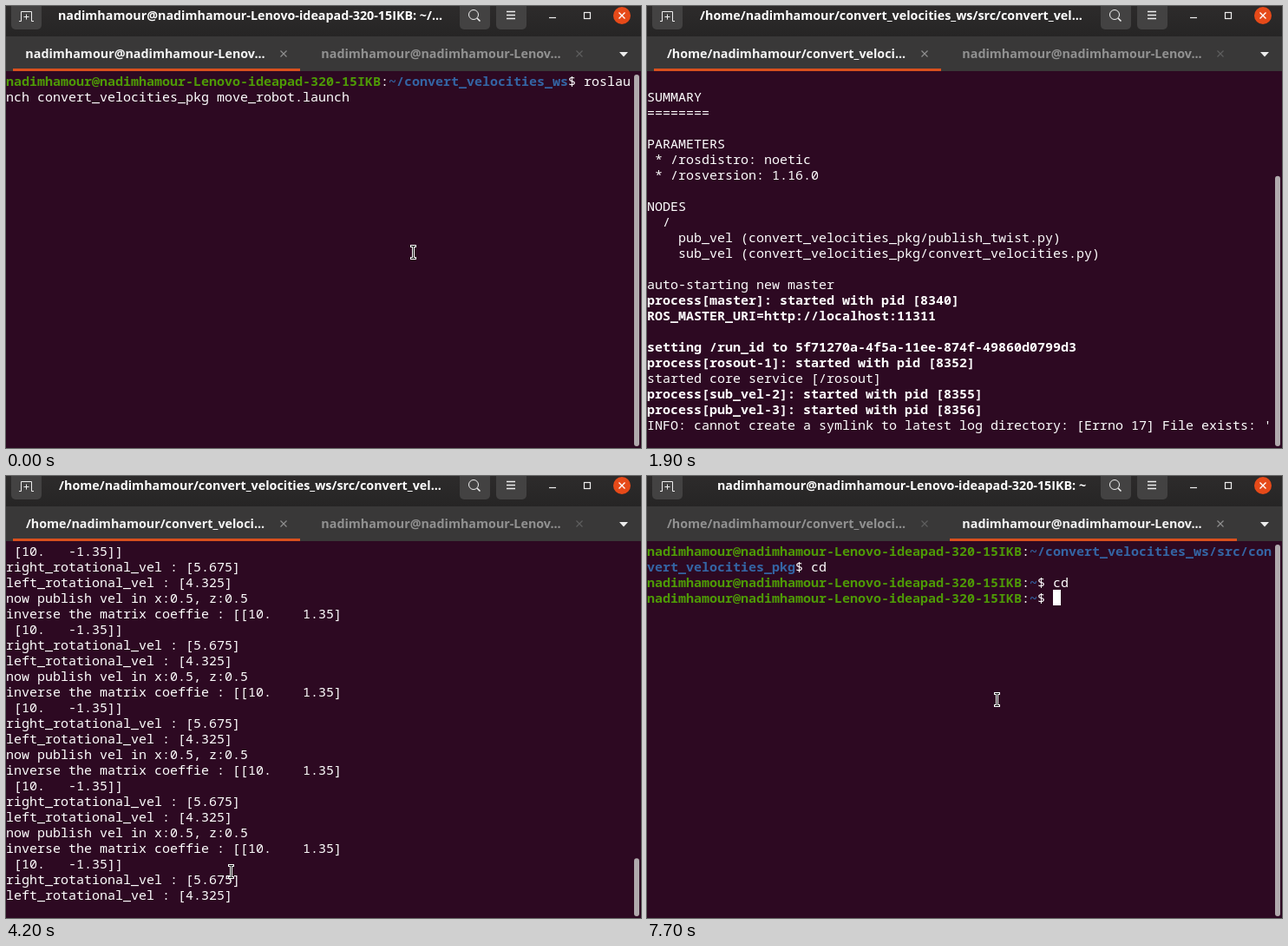
Recreate the animation shown at these times as an HTML page with a canvas. Size 732 by 509 pixels, loop 8000 ms.

```html
<!DOCTYPE html>
<html lang="en">
<head>
<meta charset="utf-8">
<title>Terminal</title>
<style>
html, body { margin: 0; width: 732px; height: 509px; overflow: hidden; background: #2d0922; }
canvas { display: block; }
</style>
</head>
<body>
<canvas id="stage" width="732" height="509"></canvas>
<script>
const ctx = document.getElementById('stage').getContext('2d');
const LOOP = 8000, STEP = 100, ROWS = 24, COL = 9, LINE = 18, TOP = 77;
const START = 1000, BURST = 300, STREAM = 2100, SWITCH = 6600;
const MONO = '15px "Noto Sans Mono", "DejaVu Sans Mono", monospace';
const SANS = '14.3px "Open Sans", "Noto Sans", sans-serif';
const GREEN = '#4e9a06', BLUE = '#3465a4', WHITE = '#fff', BACK = '#2d0922';

const user = 'nadimhamour';
const host = `${user}@${user}-Lenovo-ideapad-320-15IKB`;
const shortHost = `${user}@${user}-Lenov...`;
const runId = '5f71270a-4f5a-11ee-874f-49860d0799d3';

const prompt = (path, rest) => [[host, GREEN], [':'], [path, BLUE], [rest]];

const command = [
  prompt('~/convert_velocities_ws', '$ roslau'),
  'nch convert_velocities_pkg move_robot.launch'
];

// Output arrives in bursts
const bursts = [
`... logging to /home/${user}/.ros/log/${runId}/r
oslaunch-${user}-Lenovo-ideapad-320-15IKB-8332.log
Checking log directory for disk usage. This may take a while.
Press Ctrl-C to interrupt
Done checking log file disk usage. Usage is <1GB.
`,
`started roslaunch server http://${user}-Lenovo-ideapad-320-15IKB:36077/

SUMMARY
========

PARAMETERS
 * /rosdistro: noetic
 * /rosversion: 1.16.0

NODES
  /
    pub_vel (convert_velocities_pkg/publish_twist.py)
    sub_vel (convert_velocities_pkg/convert_velocities.py)

auto-starting new master
process[master]: started with pid [8340]`,
`ROS_MASTER_URI=http://localhost:11311

setting /run_id to ${runId}
process[rosout-1]: started with pid [8352]
started core service [/rosout]`,
`process[sub_vel-2]: started with pid [8355]
process[pub_vel-3]: started with pid [8356]
INFO: cannot create a symlink to latest log directory: [Errno 17] File exists: '
/home/${user}/.ros/log/${runId}' -> '/home/${user.slice(0, 5)}
${user.slice(5)}/.ros/log/latest'
now publish vel in x:0.5, z:0.5`
].map(s => s.split('\n'));

const cycle = [
  'now publish vel in x:0.5, z:0.5',
  'inverse the matrix coeffie : [[10.    1.35]',
  ' [10.   -1.35]]',
  'right_rotational_vel : [5.675]',
  'left_rotational_vel : [4.325]'
];

const shell = [
  prompt('~/convert_velocities_ws/src/con', ''),
  [['vert_velocities_pkg', BLUE], ['$ cd']],
  prompt('~', '$ cd'),
  prompt('~', '$ ')
];

// Mouse moves: start, end, x, y
const moves = [
  [3400, 3600, 400.5, 207.5],
  [3600, 4000, 259.5, 455.5],
  [5400, 5900, 438, 47],
  [6700, 6900, 368.5, 253.5],
  [7000, 7300, 403.5, 257.5]
];

function rect(x, y, w, h, color, r = 0) {
  ctx.fillStyle = color;
  ctx.beginPath();
  ctx.roundRect(x, y, w, h, r);
  ctx.fill();
}

function line(color, width, ...paths) {
  ctx.strokeStyle = color;
  ctx.lineWidth = width;
  ctx.beginPath();
  for (const p of paths)
    for (let i = 0; i < p.length; i += 2) ctx[i ? 'lineTo' : 'moveTo'](p[i], p[i + 1]);
  ctx.stroke();
}

function text(s, x, y, font, color, align = 'left') {
  ctx.font = font;
  ctx.fillStyle = color;
  ctx.textAlign = align;
  ctx.fillText(s, x, y);
}

function cross(x, y, r, color, width) {
  line(color, width, [x - r, y - r, x + r, y + r], [x + r, y - r, x - r, y + r]);
}

function row(content, n) {
  const y = TOP + n * LINE + 15;
  const bold = /^(started r|process|ROS_|setting)/.test(content);
  const spans = typeof content === 'string' ? [[content, bold && WHITE]] : content;
  let x = 0;
  for (const [s, color] of spans) {
    text(s, x, y, (color ? 'bold ' : '') + MONO, color || WHITE);
    x += s.length * COL;
  }
}

function printed(t) {
  const lines = [...command];
  bursts.forEach((burst, i) => {
    const share = Math.floor((t - START - i * BURST) / STEP + 1) / 2;
    lines.push(...burst.slice(0, Math.ceil(burst.length * Math.min(1, Math.max(0, share)))));
  });
  return lines;
}

function terminal(t) {
  let lines = shell, total = ROWS, cursor = [52, 3];
  if (t < SWITCH) {
    const cycles = Math.max(0, (t - STREAM) * 0.0112);
    lines = printed(t);
    total = Math.max(ROWS, lines.length + 1 + cycles * cycle.length);
    for (let i = 1; i <= Math.min(cycles, 6); i++) lines.push(...cycle);
    lines = lines.slice(Math.max(0, lines.length + 1 - ROWS));
    cursor = t < START ? [45, 1] : [0, lines.length];
  }
  lines.forEach(row);

  const since = t - (t < SWITCH ? 2000 : 6500);
  const lit = t < 1400 ? t >= 300 : (since + 1200) % 1200 < 600;
  if (lit) rect(cursor[0] * COL, TOP + cursor[1] * LINE, COL, LINE, WHITE);

  const thumb = Math.max(40, 428 * ROWS / total);
  rect(724, 507 - thumb, 6, thumb, '#b0aaad', 3);
}

function tab(x, label, active) {
  text(label, x + 152.5, 60, 'bold ' + SANS, active ? '#f4f4f4' : '#919191', 'center');
  cross(x + 312, 55, 3.5, active ? '#8f8f8f' : '#5e5e5e', 1.2);
  if (active) rect(x, 72, 331, 3, '#d9501e');
}

function header(t) {
  const second = t >= SWITCH, running = t >= START;
  const shade = ctx.createLinearGradient(0, 0, 0, 35);
  shade.addColorStop(0, '#2d2b2b');
  shade.addColorStop(1, '#262525');
  rect(0, 0, 732, 35, shade);
  rect(0, 35, 732, 40, '#393838');

  for (const x of [6, 523, 565]) rect(x, -8, 35, 35, '#434242', 5);
  // new tab
  line('#eee', 1, [15, 17.5, 17.5, 17.5, 17.5, 6.5, 29.5, 6.5, 29.5, 17.5, 32, 17.5],
    [20.5, 12.5, 26.5, 12.5], [23.5, 9.5, 23.5, 15.5]);
  // search
  ctx.beginPath();
  ctx.arc(539, 10, 5.5, 0, 7);
  ctx.stroke();
  line('#eee', 1.6, [543, 14, 546.5, 17.5]);
  // menu
  line('#eee', 1.3, ...[6.5, 10.5, 14.5].map(y => [577, y, 587, y]));
  // window buttons
  line('#eee', 1.2, [626, 13.5, 634, 13.5]);
  ctx.strokeRect(666.5, 7.5, 7, 7);
  rect(700, 1, 20, 20, '#e64a19', 10);
  cross(710, 11, 3.5, WHITE, 1.4);
  // tab menu
  ctx.fillStyle = '#eee';
  ctx.fill(new Path2D('M707 53H717L712 58.5Z'));

  const title = second ? host + ': ~'
    : running ? `/home/${user}/convert_velocities_ws/src/convert_vel...` : host + ': ~/...';
  text(title, second ? 293.5 : 281.5, 16, 'bold ' + SANS, WHITE, 'center');

  tab(8, running ? `/home/${user}/convert_veloci...` : shortHost, !second);
  tab(349, shortHost, second);
}

function tooltip(t) {
  if (t < 6200 || t >= SWITCH) return;
  ctx.globalAlpha = t < 6300 ? 0.5 : 1;
  rect(252, 72, 439, 53, '#000', 6);
  ctx.strokeStyle = '#262626';
  ctx.lineWidth = 1;
  ctx.beginPath();
  ctx.roundRect(256.5, 76.5, 430, 44, 5);
  ctx.stroke();
  text(host + ': ~', 270, 104, SANS, WHITE);
  ctx.globalAlpha = 1;
}

function pointer(t) {
  if (t >= 800 && t < 3500) return;
  let x = 469.5, y = 283.5;
  for (const [from, to, endX, endY] of moves) {
    const p = Math.min(1, Math.max(0, (t - from) / (to - from)));
    const ease = p * p * (3 - 2 * p);
    x += (endX - x) * ease;
    y += (endY - y) * ease;
  }
  ctx.save();
  ctx.translate(x, y);
  if (y < TOP) {
    const arrow = new Path2D('M.5 .5V16L4.3 12.5L7 19L10 17.7L7.2 11.5H12Z');
    ctx.fillStyle = '#000';
    ctx.strokeStyle = WHITE;
    ctx.lineWidth = 1.2;
    ctx.fill(arrow);
    ctx.stroke(arrow);
  } else {
    const beam = [[-2, -7, 2, -7], [0, -7, 0, 7], [-2, 7, 2, 7]];
    ctx.lineCap = 'square';
    line(WHITE, 3, ...beam);
    line('#111', 1, ...beam);
  }
  ctx.restore();
}

function draw(now) {
  const t = Math.floor(now % LOOP / STEP) * STEP;
  rect(0, 0, 732, 509, BACK);
  terminal(t);
  header(t);
  tooltip(t);
  pointer(t);
  requestAnimationFrame(draw);
}
requestAnimationFrame(draw);
</script>
</body>
</html>
```
